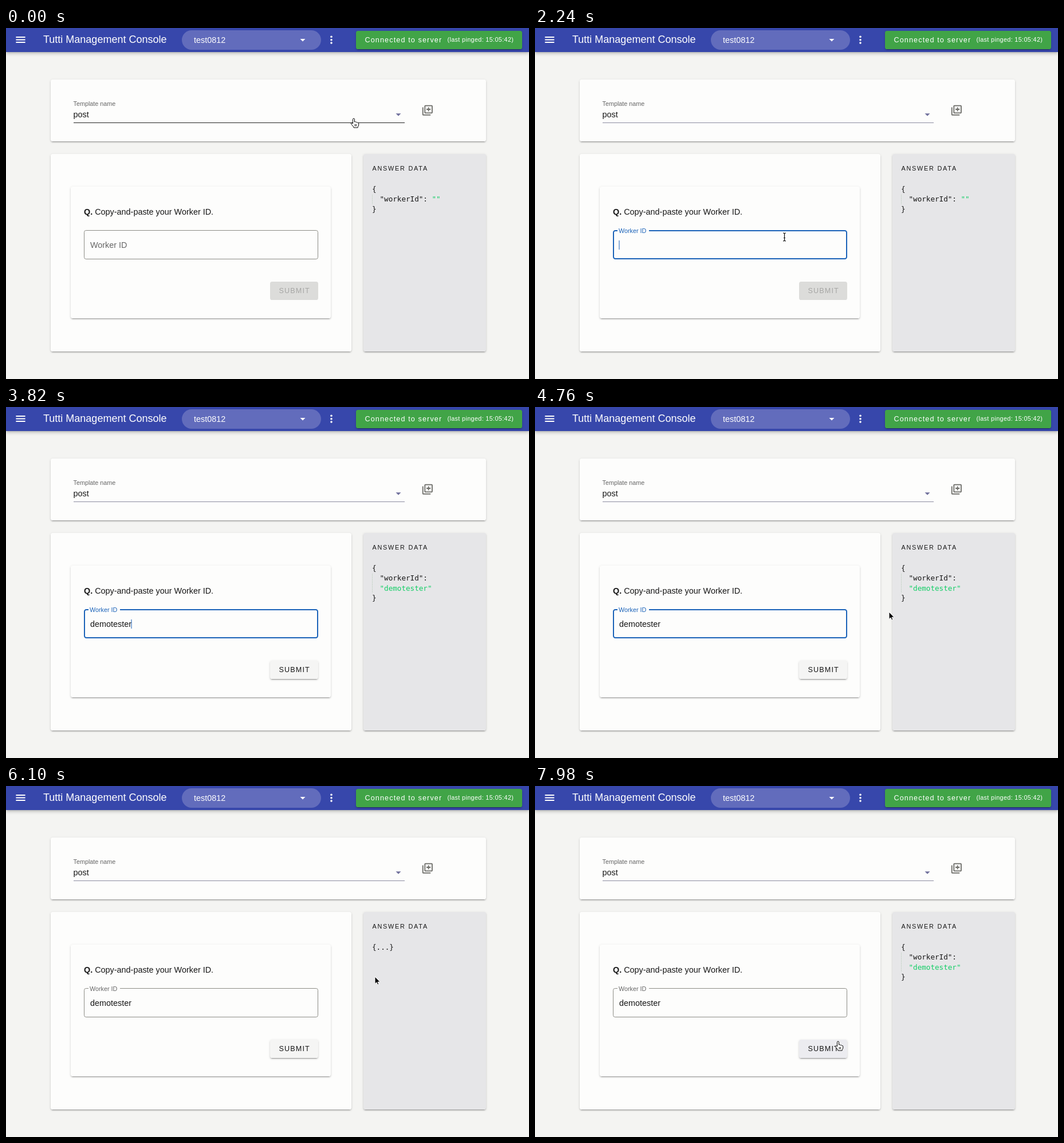
Write an HTML page that moves like this. It is 913 px wide and 613 px high and loops after 8000 ms.

```html
<!DOCTYPE html>
<html lang="en">
<head>
<meta charset="utf-8">
<title>Management console</title>
<style>
  html, body { margin: 0; width: 100%; height: 100%; overflow: hidden; background: #f4f4f2; }
  div { position: absolute; box-sizing: border-box; border-radius: 3.6px; }
  svg { position: absolute; left: 0; top: 0; }
  text { font: 14.4px "Liberation Sans", Arial, sans-serif; fill: #161616; white-space: pre; }
  .white { fill: #fff; }
  .small { font-size: 10.8px; fill: #666; }
  .button { font-size: 12.6px; letter-spacing: 1.125px; }
  .mono { font: 12.6px "DejaVu Sans Mono", monospace; }
  .raised { box-shadow: 0 2.7px 1px -1.8px #0003, 0 1.8px 1.8px #00000024, 0 1px 4.5px #0000001f; }
  .card { background: #fdfdfc; }
  #bar { left: 0; top: 0; width: 100%; height: 42px; border-radius: 0; background: #3747ab;
    box-shadow: 0 1.8px 3.6px -1px #0003, 0 3.6px 4.5px #0000001a, 0 1px 9px #00000014; }
</style>
</head>
<body>
<div id="bar"></div>
<div style="left:307px;top:4px;width:243px;height:34px;border-radius:17px;background:#626cbc"></div>
<div class="raised" style="left:611px;top:5px;width:290px;height:32px;background:#41a447"></div>
<div class="card raised" style="left:78px;top:90px;width:760px;height:108px"></div>
<div class="card raised" style="left:78px;top:220px;width:525px;height:345px"></div>
<div class="card raised" style="left:113px;top:277px;width:454px;height:230px"></div>
<div class="raised" style="left:624px;top:220px;width:214px;height:345px;background:#e6e6e8"></div>
<div id="submit" style="left:461px;top:442.5px;width:84px;height:32px"></div>

<svg width="913" height="613" viewBox="0 0 913 613">
  <g class="white">
    <path transform="translate(14.7 9.7) scale(.9)" d="M3 6h18v2H3zm0 5h18v2H3zm0 5h18v2H3z"/>
    <path transform="translate(507.2 9.9) scale(.9)" d="M7 10l5 5 5-5z"/>
    <circle cx="568" cy="15.3" r="1.8"/><circle cx="568" cy="20.7" r="1.8"/><circle cx="568" cy="26.1" r="1.8"/>
  </g>
  <text class="white" x="65" y="26.4" style="font-size:18px">Tutti Management Console</text>
  <text class="white" x="328" y="26">test0812</text>
  <text class="white button" x="626.5" y="25">Connected to server</text>
  <text class="white" x="770.5" y="24.4" style="font-size:10.8px;letter-spacing:.36px">(last pinged: 15:05:42)</text>

  <text class="small" x="117.5" y="136">Template name</text>
  <text x="117.5" y="156">post</text>
  <path id="underline" d="M118 165.5H696"/>
  <path transform="translate(674.2 140.2) scale(.9)" fill="#70709c" d="M7 10l5 5 5-5z"/>
  <path transform="translate(725 133) scale(.9)" fill="#6b6b66" d="M18 11H15V14H13V11H10V9H13V6H15V9H18M20 4V16H8V4H20M20 2H8C6.9 2 6 2.9 6 4V16C6 17.1 6.9 18 8 18H20C21.1 18 22 17.1 22 16V4C22 2.9 21.1 2 20 2M4 20H18V22H4C2.9 22 2 21.1 2 20V6H4V20Z"/>

  <text x="136" y="326"><tspan font-weight="bold">Q.</tspan> Copy-and-paste your Worker ID.</text>
  <rect id="field" rx="3.2" fill="none"/>
  <rect id="gap" x="144" y="352" height="5" fill="#fdfdfc"/>
  <text id="label">Worker ID</text>
  <text id="value" x="147" y="383.6"></text>
  <rect id="caret" y="371" width="1" height="16" fill="#1a5fb4"/>
  <text id="submitText" class="button" x="476.5" y="463">SUBMIT</text>

  <text x="639.5" y="249" style="font-size:10.8px;letter-spacing:1.8px">ANSWER DATA</text>
  <path id="guide" stroke="#c3d2c6" stroke-dasharray="2 1"/>
  <text id="open" class="mono" x="639" y="286"></text>
  <text id="key" class="mono" x="652.5" y="303.3">"workerId":</text>
  <text id="answer" class="mono" style="fill:#13ce66"></text>
  <text id="close" class="mono" x="639">}</text>

  <g id="cursor" stroke-linejoin="round">
    <path id="hand" fill="#fff" stroke="#000" d="M-1.5 9V1.5a1.5 1.5 0 0 1 3 0V6q2-1 2.6.6 2-.8 2.6.8 2-.4 2 1.4V11q0 2-1.5 3.5V16H0V15L-4.6 9.4q-.4-2 1.2-1.6Q-2 8-1.5 9ZM2.2 10v3.5M4.3 10v3.5"/>
    <path id="beam" fill="none" stroke="#111" stroke-width="1.2" d="M-2.5-7Q0-7 0-5.5 0-7 2.5-7M0-5.5V5.5M-2.5 7Q0 7 0 5.5 0 7 2.5 7M-1.5 1.5h3"/>
    <path id="arrow" stroke="#fff" d="M0 0V12.5L2.9 9.9 4.8 14.2 6.9 13.3 5 9.2H9Z"/>
  </g>
</svg>

<script>
const LOOP = 8000;
const WORKER = "demotester";
const FOCUS = 1950, BLUR = 5550, EXPAND = 6800;
const TYPE_START = 2640, TYPE_END = 3740, HIDE_POINTER_UNTIL = 4300;
const TOP = 286, LINE = 17.3, CHAR = 7.585;

// Pointer stops: time, x, y
const stops = [
  [0, 607, 158], [300, 607, 158], [1050, 441.5, 358], [1300, 441.5, 358], [1750, 435.5, 365],
  [4300, 435.5, 365], [4760, 618, 358], [5250, 644, 333], [6250, 644, 333],
  [6650, 647, 283], [7050, 647, 283], [7750, 529, 446], [LOOP, 529, 446]
];

const $ = id => document.getElementById(id);
const set = (id, attrs) => {
  for (const name in attrs) $(id).setAttribute(name, attrs[name]);
};
const show = (id, on) => set(id, { visibility: on ? "visible" : "hidden" });
const clamp = v => Math.min(1, Math.max(0, v));
const smooth = v => v * v * (3 - 2 * v);

function pointerAt(t) {
  const i = stops.findIndex(s => s[0] > t);
  const [t0, x0, y0] = stops[i - 1], [t1, x1, y1] = stops[i];
  const k = smooth((t - t0) / (t1 - t0));
  return [x0 + (x1 - x0) * k, y0 + (y1 - y0) * k];
}

function drawField(t, text, focused, hovered) {
  const float = 1 - (1 - clamp((t - FOCUS) / 250)) ** 3;
  const inset = focused ? 1 : 0.5;
  const blue = "#1a62b8";
  set("field", {
    x: 136 + inset, y: 353 + inset, width: 409 - 2 * inset, height: 51 - 2 * inset,
    stroke: focused ? blue : hovered ? "#62625c" : "#8c8c86", "stroke-width": 2 * inset
  });
  set("gap", { width: 55 * float });
  set("label", { transform: `translate(${147 - float} ${383.6 - 25.6 * float}) scale(${1 - 0.25 * float})` });
  $("label").style.fill = focused ? blue : "#666";
  $("value").textContent = text;

  const blinkStart = t < TYPE_START ? FOCUS : TYPE_END;
  const blinkOn = t < blinkStart || (t - blinkStart) % 1060 < 530;
  show("caret", focused && blinkOn);
  set("caret", { x: 146.5 + (text ? $("value").getComputedTextLength() : 0) });
}

function drawSubmit(enabled, hovered) {
  $("submit").className = enabled ? "raised" : "";
  $("submit").style.background = !enabled ? "#dcdcda" : hovered ? "#ececf0" : "#f5f5f4";
  $("submitText").style.fill = enabled ? "#161616" : "#a6a6a4";
}

function drawAnswer(text, collapsed, hoverOpen, hoverClose) {
  const wrapped = text.length > 8;
  const closeY = TOP + LINE * (wrapped ? 3 : 2);
  const tint = hovered => hovered ? "#1890ff" : "#161616";
  $("open").textContent = collapsed ? "{...}" : "{";
  $("answer").textContent = `"${text}"`;
  set("answer", { x: 652.5 + (wrapped ? 0 : 12 * CHAR), y: TOP + LINE * (wrapped ? 2 : 1) });
  set("close", { y: closeY });
  set("guide", { d: `M639.5 291V${closeY - 13}` });
  for (const id of ["key", "answer", "close", "guide"]) show(id, !collapsed);
  $("open").style.fill = tint(hoverOpen);
  $("close").style.fill = tint(hoverClose);
}

function draw(t) {
  const [x, y] = pointerAt(t);
  const over = (left, top, right, bottom) => x >= left && x <= right && y >= top && y <= bottom;
  const typed = Math.ceil(clamp((t - TYPE_START) / (TYPE_END - TYPE_START)) * WORKER.length);
  const text = WORKER.slice(0, typed);
  const collapsed = t >= BLUR && t < EXPAND;

  const overSelect = over(118, 132, 696, 166);
  const overField = over(136, 353, 545, 404);
  const overSubmit = typed > 0 && over(461, 442, 545, 475);
  const overOpen = over(639, 274, collapsed ? 677 : 648, 291);
  const overClose = !collapsed && typed > 8 && over(639, 326, 648, 343);

  set("underline", { stroke: overSelect ? "#222" : "#8b8ba0" });
  drawField(t, text, t >= FOCUS && t < BLUR, overField);
  drawSubmit(typed > 0, overSubmit);
  drawAnswer(text, collapsed, overOpen, overClose);

  const shape = overField ? "beam" : overSelect || overSubmit || overOpen || overClose ? "hand" : "arrow";
  const hidden = t >= TYPE_START && t < HIDE_POINTER_UNTIL;
  set("cursor", { transform: `translate(${x} ${y})` });
  for (const id of ["hand", "beam", "arrow"]) show(id, id === shape && !hidden);
}

function tick() {
  draw(performance.now() % LOOP);
  requestAnimationFrame(tick);
}
tick();
</script>
</body>
</html>
```
